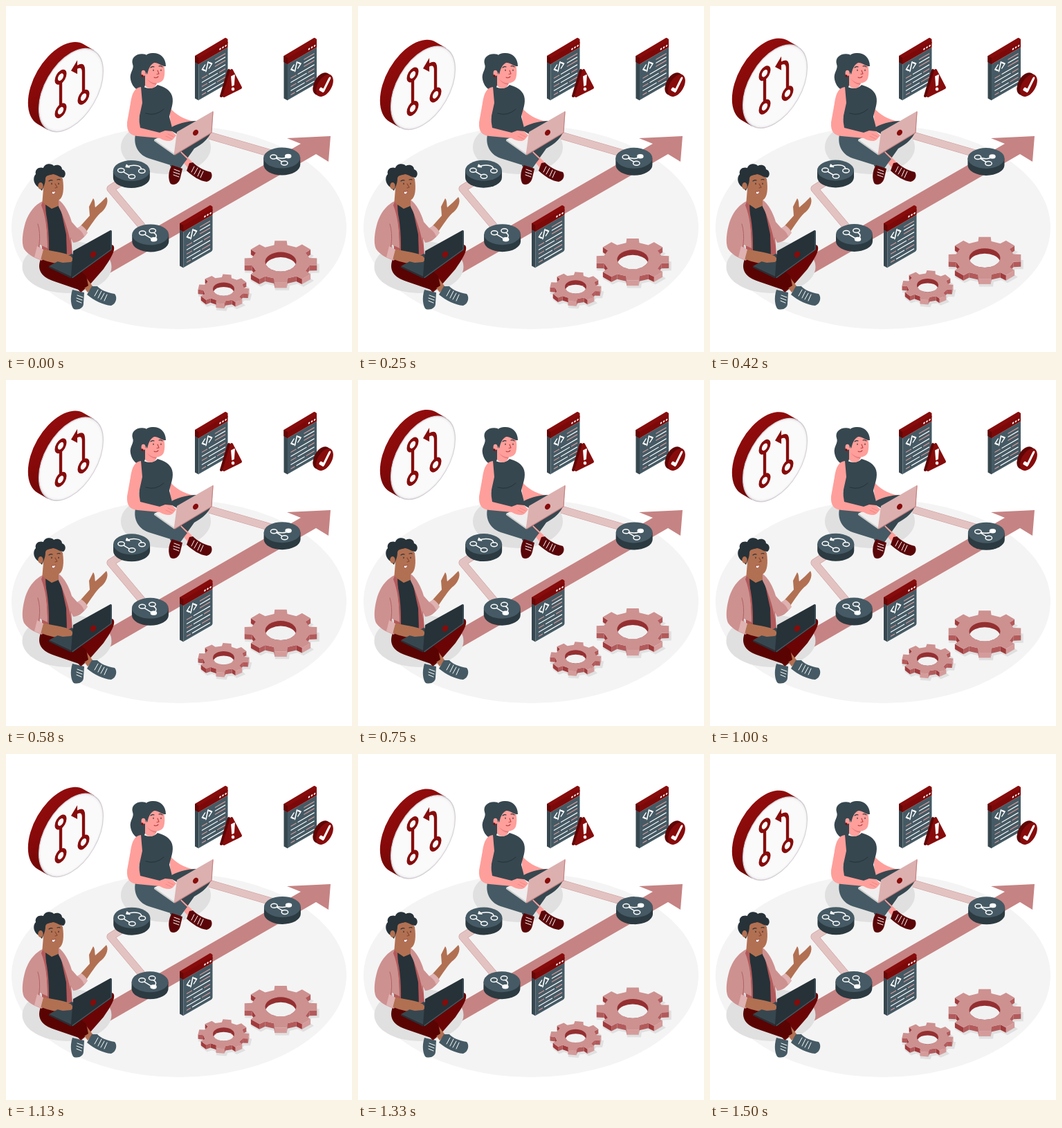
Animation, 500 px wide and 500 px high, one loop 1540 ms. Source, as an HTML page:

```html
<!DOCTYPE html>
<html lang="en">
<head>
<meta charset="utf-8">
<title>Pull request workflow</title>
<style>
  html, body { margin: 0; height: 100%; overflow: hidden; background: #fff; }
  svg { display: block; width: 100vw; height: 100vh; }
  .line { fill: none; stroke-linecap: round; stroke-linejoin: round; }
  .red { fill: #870b0b; }
  .rose { fill: #c68383; }
  .pink { fill: #cd9190; }
  .slate { fill: #455a64; }
  .dark { fill: #37474f; }
  .ink { fill: #263238; }
  .skin { fill: #ff9f9b; }
  .tan { fill: #b27052; }
  .shade { fill: #e0e0e0; }
</style>
</head>
<body>
<svg viewBox="0 0 500 500">
  <defs>
    <linearGradient id="rim" x1="0" y1="0" x2="0" y2="1">
      <stop offset="0" stop-color="#920c0c"/>
      <stop offset=".45" stop-color="#870909"/>
      <stop offset="1" stop-color="#6c0606"/>
    </linearGradient>
    <g id="window">
      <path class="dark" d="M273 72l5.500 3v61.500l-5.500-3z"/>
      <path class="red" d="M273 72L315 47q2-1.500 3.500-.500l2 1.500v6L278.500 84l-5.500-3z"/>
      <path d="M273 72l5.500 3v9l-5.500-3z" fill="#640606"/>
      <g transform="matrix(1 -.577 0 1 278.500 75)">
        <path class="slate" d="M0 9H42V59q0 2-2 2H0z"/>
        <path d="M0 0H40q2 0 2 2V9H0z" fill="#7c0909"/>
        <g fill="#fff"><circle cx="31" cy="5" r="1.300"/><circle cx="35" cy="5" r="1.300"/><circle cx="39" cy="5" r="1.300"/></g>
        <g class="line" stroke="#fff">
          <path stroke-width="1.800" d="M9 15.500L5 19.500l4 4M15 15.500l4 4-4 4M13.500 13.500l-3 12"/>
          <path stroke-width="1.400" d="M24 21H38M15 32H38M5 38H27M15 44H38M5 50H24M13 56H38"/>
          <path stroke="#d59b9b" stroke-width="1.400" d="M24 16H38M24 26H38M5 32h7M30 38h8M5 44h7M27 50h11M5 56h5"/>
        </g>
      </g>
    </g>
    <g id="puck">
      <path d="M-26.500 0V10A26.500 15 0 0 0 26.500 10V0z" fill="#2c3a41"/>
      <ellipse class="slate" rx="26.500" ry="15"/>
    </g>
  </defs>

  <ellipse cx="250" cy="320" rx="242" ry="147" fill="#f4f4f4"/>
  <path class="rose" d="M406 191L469 188 466 225 448 214 129 398 112 380 426 199z"/>
  <g class="line">
    <path stroke="#c99" stroke-width="11" d="M400 218L290 186M181 245L151 264 208 332"/>
    <path stroke="#e3c3c2" stroke-width="9.800" d="M400 218L290 186M181 245L151 264 208 332"/>
    <path stroke="#d7a9a8" stroke-width="10" d="M190 240L238 214"/>
  </g>
  <ellipse class="shade" cx="231" cy="204" rx="65" ry="39"/>
  <ellipse class="shade" cx="88" cy="377" rx="64.500" ry="38"/>

  <g id="pucks">
    <g transform="translate(181.500 237.500)">
      <use href="#puck"/>
      <g class="line" stroke="#fff" stroke-width="1.500">
        <ellipse cx="-15" cy="-.500" rx="4.700" ry="3"/><ellipse cx=".500" cy="8.500" rx="4.700" ry="3"/><ellipse cx="15" cy=".500" rx="4.700" ry="3"/>
        <path d="M-11 2L-3.500 6.500M14-2.500C14-8 2-9-6-6"/>
        <path fill="#fff" d="M-8-5.500l1-3 4 3.500z"/>
      </g>
    </g>
    <g transform="translate(208.500 330)">
      <use href="#puck"/>
      <g class="line" stroke="#fff" stroke-width="1.500">
        <ellipse cx="-11.500" cy="-2.500" rx="4.700" ry="3"/><ellipse cx="3" cy="-5.500" rx="4.700" ry="3"/><ellipse cx="5" cy="7" rx="4" ry="2.500" fill="#fff"/>
        <path d="M-8 0L2 6M5-2.500C10 0 9 4 6 6"/>
      </g>
    </g>
    <g transform="translate(399 220)">
      <use href="#puck"/>
      <g class="line" stroke="#fff" stroke-width="1.500">
        <ellipse cx="-12" cy="-1.500" rx="4.700" ry="3"/><ellipse cx="3.500" cy="7.500" rx="4.700" ry="3"/><ellipse cx="9" cy="-2.500" rx="4" ry="2.500" fill="#fff"/>
        <path d="M-8 .500L0 5.500M-8-.500C-2 1 5 1 8-2"/>
      </g>
    </g>
  </g>

  <use href="#window"/>
  <use href="#window" x="128.500"/>
  <use href="#window" x="-22" y="242"/>

  <g stroke-linejoin="round">
    <path d="M322 93L311 130 335 120z" fill="#5f0505" stroke="#5f0505" stroke-width="4"/>
    <path class="red" d="M326 93L315 130 339 118z" stroke="#870b0b" stroke-width="4"/>
    <path d="M326 102l4-2-1 14-2 1z" fill="#fff" stroke="#fff" stroke-width="1.800"/>
    <ellipse cx="328" cy="120" rx="2.300" ry="2.500" fill="#fff"/>
  </g>
  <g transform="matrix(.866 -.5 0 1 460.500 115)">
    <path fill="#5f0505" d="M10.100-10.100l-6-6A14.300 14.300 0 0 0-16.100 4.100l6 6z"/>
    <circle class="red" r="14.300"/>
    <path class="line" stroke="#fff" stroke-width="4.400" d="M-7 1.500l5 5L8-6"/>
  </g>

  <!-- woman -->
  <g>
    <path class="dark" d="M202 70C190 67 180 74 183 84C186 91 178 96 180 106C182 117 190 124 198 121C204 113 202 98 206 84Z"/>
    <path class="skin" d="M236 146C246 158 256 163 272 167L269 177 238 174Z"/>
    <path class="dark" d="M234 178C255 165 285 162 297 172C300 182 291 196 272 206L248 240 237 231C240 222 248 212 256 206Z"/>
    <path class="skin" d="M253 210l16 15-6 9-14-16z"/>
    <path class="slate" d="M188 182C183 198 189 214 206 220L238 230 250 236 262 221C252 212 246 204 240 200L236 180Z"/>
    <path class="dark" d="M195 114C200 120 213 121 219 114C229 117 237 121 240 130C243 140 238 150 236 160L242 184C220 189 200 188 190 184C192 170 194 160 191 150C194 138 192 126 195 114Z"/>
    <path class="line" stroke="#263238" d="M202 155q14 5 26-6"/>
    <path class="skin" d="M201 98V115C206 121 214 120 217 114L218 104Z"/>
    <path d="M203 104q6 8 15 7l-1 3q-9-1-14-10z" fill="#e8817f"/>
    <path class="skin" d="M200 82C203 78 224 78 228 84C230 92 230 104 226 108C219 115 207 110 203 104Z"/>
    <path class="dark" d="M196 98C192 80 199 69 211 68C222 67 231 74 231 87C224 87 219 81 214 82C207 86 206 92 204 99C201 92 197 93 196 98Z"/>
    <ellipse class="skin" cx="198.500" cy="97" rx="3" ry="4.200"/>
    <circle class="red" cx="197" cy="101" r="1.700"/>
    <g class="line" stroke="#263238" stroke-width="1.100">
      <path d="M209 89q3-2 5-1M221 87q3-1 5 1M213 92v1.500M224 92v1.500"/>
      <path stroke="#b8403f" d="M219 93l2 5-3 .500M214 103q3 2 6-1"/>
    </g>
    <path d="M214 193L240 181 267 196 243 214.500Z" fill="#f0eeee"/>
    <path d="M214 193L243 213v2.500L214 195z" fill="#cfcfcf"/>
    <path d="M247 182L299 152q1 0 .500 2L297 183 244 215q-2 0-1-3z" fill="#dcb0af"/>
    <path class="line" stroke="#c68383" stroke-width="1.200" d="M299 153L297 183 244 215"/>
    <ellipse class="red" cx="274" cy="183" rx="3.600" ry="4.600" transform="rotate(40 274 183)"/>
    <path class="skin" d="M195 117C186 118 182 126 180 140L175 168C174 182 180 187 190 188L222 191C230 196 238 196 241 193L246 187 240 181 230 180 222 183 194 176 192 163 197 140Z"/>
    <path class="line" stroke="#e8817f" stroke-width=".8" d="M234 185l8 4M231 188l8 4"/>
    <path fill="#5a0508" d="M240 230C234 238 234 252 238 257C244 260 250 256 252 248L255 235Z"/>
    <path fill="#5a0508" d="M265 227L261 238C270 246 280 253 290 254C298 252 299 244 296 240C286 238 276 232 270 226Z"/>
    <path class="line" stroke="#fff" stroke-width="1" d="M243 236l8 3M242 240l9 3M242 244l8 3M272 232l-4 8M277 234l-5 9M281 237l-4 9M285 239l-4 9"/>
  </g>

  <!-- man -->
  <g>
    <path class="tan" d="M54 264L52 288 66 300 80 290 76 280Z"/>
    <path d="M53 282L62 296 62 360 52 352 50 300zM76 284L84 296 94 334 96 360 88 360z" fill="#b35a5b"/>
    <path class="ink" d="M57 287L66 293 78 288 87 330 88 360H61Z"/>
    <path d="M112 352C125 344 145 341 155 346C159 351 153 363 141 380L120 404 108 414 96 400 112 378Z" fill="#6b0505"/>
    <path class="tan" d="M114 390l12 16-8 8-10-14z"/>
    <path d="M50 366C44 382 52 392 70 398L108 411 119 404 116 390 92 370Z" fill="#5a0303"/>
    <path class="tan" d="M104 322L121 303 120 290 126 278C129 281 128 288 129 291L137 284 145 276C148 280 147 290 138 298C132 302 126 312 112 332Z"/>
    <path class="pink" d="M76 280C84 286 91 298 95 312L103 321 109 318C114 322 117 326 116 330C111 337 104 342 97 342L93 334 94 345C90 325 84 305 76 290Z"/>
    <path d="M103 321l6-4q8 6 9 11l-5 5q-3-8-10-12z" fill="#dfb1b0"/>
    <path class="pink" d="M53 282C42 287 33 298 28 313C24 327 22 342 26 351C33 361 44 365 52 368L56 358 50 352 49 345 60 350Q60 310 53 282Z"/>
    <path d="M53 282Q63 310 62 358L60 350Q60 310 51 288z" fill="#b35a5b"/>
    <path class="line" stroke="#b06263" d="M48 345q2-18-2-30M48 345l-2 8"/>
    <path class="tan" d="M50 351C62 353 76 355 93 360L99 366 92 372 80 373C64 371 52 367 44 362Z"/>
    <path d="M45 347l9 5-4 15-9-4z" fill="#dfb1b0"/>
    <path class="tan" d="M51 250C52 240 78 240 82 250C84 264 83 276 77 280C69 284 60 280 55 272Z"/>
    <path class="ink" d="M47 262C40 258 38 248 43 243C41 235 49 232 54 234C56 227 66 227 69 231C75 228 81 231 81 236C87 238 87 245 83 248C78 248 74 244 68 243C62 245 58 244 57 249C57 258 53 263 52 267Z"/>
    <ellipse class="tan" cx="50" cy="260" rx="3.700" ry="5"/>
    <g class="line" stroke="#263238" stroke-width="1.200">
      <path d="M62 253q3-2 5-1M74 251q3-1 4 0M66 256v1.500M76 256v1.500"/>
      <path stroke="#85472f" d="M71 257l3 5-3 1"/>
    </g>
    <path d="M66 268q4 1 6-1q-1 5-4 5-2-1-2-4z" fill="#fff" stroke="#8e3d33" stroke-width=".7"/>
    <path class="dark" d="M62 376L95 358 118 370 94 391Z"/>
    <path class="ink" d="M62 376L94 391v2.500L62 378z"/>
    <path class="tan" d="M75 358L93 361 98 366 94 370 82 371 74 369Z"/>
    <path class="ink" d="M97 354L151 324q2 0 2 2V352L97 393q-3 0-3-3z"/>
    <path class="line" stroke="#455a64" stroke-width="1.300" d="M152 325.500V352L96 392.500"/>
    <ellipse class="red" cx="126" cy="359" rx="4" ry="4.800" transform="rotate(35 126 359)"/>
    <path class="slate" d="M96 410C92 422 94 434 98 438C106 440 112 436 112 430L113 414Z"/>
    <path class="slate" d="M124 405L117 417C128 426 140 432 152 433C160 430 161 420 157 416C146 414 136 410 132 405Z"/>
    <path class="line" stroke="#fff" d="M103 418l8 3M102 422l8 3M102 426l7 3M133 410l-5 9M138 412l-5 10M142 415l-5 9M146 417l-4 9"/>
  </g>

  <g id="floating">
    <g transform="matrix(.866 -.5 0 1 94 122.500)">
      <path fill="url(#rim)" d="M38.400-38.400l-17.500-17.500A54.300 54.300 0 0 0-55.900 20.900l17.500 17.500z"/>
      <circle r="53.600" fill="#f5f3f5" stroke="#d3ced3" stroke-width="1.400"/>
      <circle r="51" fill="#fafafa"/>
      <g class="line" stroke="#870b0b" stroke-width="5">
        <circle cx="-17.300" cy="-27.500" r="7.300"/><circle cx="-17.300" cy="21" r="7.300"/><circle cx="20.800" cy="20.500" r="7.300"/>
        <path stroke-linecap="butt" d="M-17.300-20.500V14M20.800 13.500V-17Q20.800-28 10-28H7"/>
      </g>
      <path class="red" d="M0-28L10.500-38V-18z"/>
    </g>
  </g>
</svg>
<script>
const LOOP = 1540;
const floating = document.getElementById('floating');
const pucks = document.getElementById('pucks');

// Flat eight-toothed gear seen from above at an angle, extruded downwards.
function gear(cx, cy, rx, turn, holeRx, depth) {
  const squash = 0.58, points = [];
  for (let tooth = 0; tooth < 8; tooth++) {
    for (const [offset, radius] of [[-13, 0.8], [-9.5, 1], [9.5, 1], [13, 0.8]]) {
      const a = (tooth * 45 + turn + offset) * Math.PI / 180;
      points.push([rx * radius * Math.cos(a), rx * radius * squash * Math.sin(a)]);
    }
  }
  const outline = 'M' + points.map(p => p.map(v => v.toFixed(1))).join('L') + 'z';
  const sides = points.map(([x, y], i) => {
    const [x2, y2] = points[(i + 1) % points.length];
    if (x2 >= x) return '';
    const leftFacing = (y2 - y) / Math.hypot(x2 - x, y2 - y) < -0.25;
    const toothEnd = i % 4 === 1 && x + x2 > -rx / 2;
    const fill = leftFacing ? '#a13b3d' : toothEnd ? '#d49b9a' : '#b35a5b';
    return `<path fill="${fill}" d="M${x} ${y}L${x2} ${y2}v${depth}L${x} ${y + depth}z"/>`;
  }).join('');
  const ry = holeRx * 0.62;
  const edge = holeRx * Math.sqrt(1 - (depth / 2 / ry) ** 2);
  const arc = `A${holeRx} ${ry} 0 0 `;
  return `<g transform="translate(${cx} ${cy})">
    <path class="shade" stroke="#e0e0e0" stroke-width="3" transform="translate(2 ${depth + 2})" d="${outline}"/>
    ${sides}
    <path class="pink" d="${outline}"/>
    <ellipse rx="${holeRx}" ry="${ry}" fill="#942f31"/>
    <path fill="#f1f1f1" d="M${-edge} ${depth / 2}${arc}1 ${edge} ${depth / 2}${arc}1 ${-edge} ${depth / 2}z"/>
  </g>`;
}

floating.insertAdjacentHTML('beforeend',
  gear(397, 370.5, 53, 0, 22.5, 7.5) + gear(314.5, 410, 37, 8, 15.5, 6.5));

function draw(now) {
  const phase = Math.min((now % LOOP + 40) / LOOP, 1);
  const lift = 10 * (1 - Math.abs(2 * phase - 1));
  floating.setAttribute('transform', `translate(0 ${-0.4 - lift})`);
  pucks.setAttribute('transform', `rotate(${phase - 0.3} 290 280)`);
  requestAnimationFrame(draw);
}
draw(performance.now());
</script>
</body>
</html>
```
